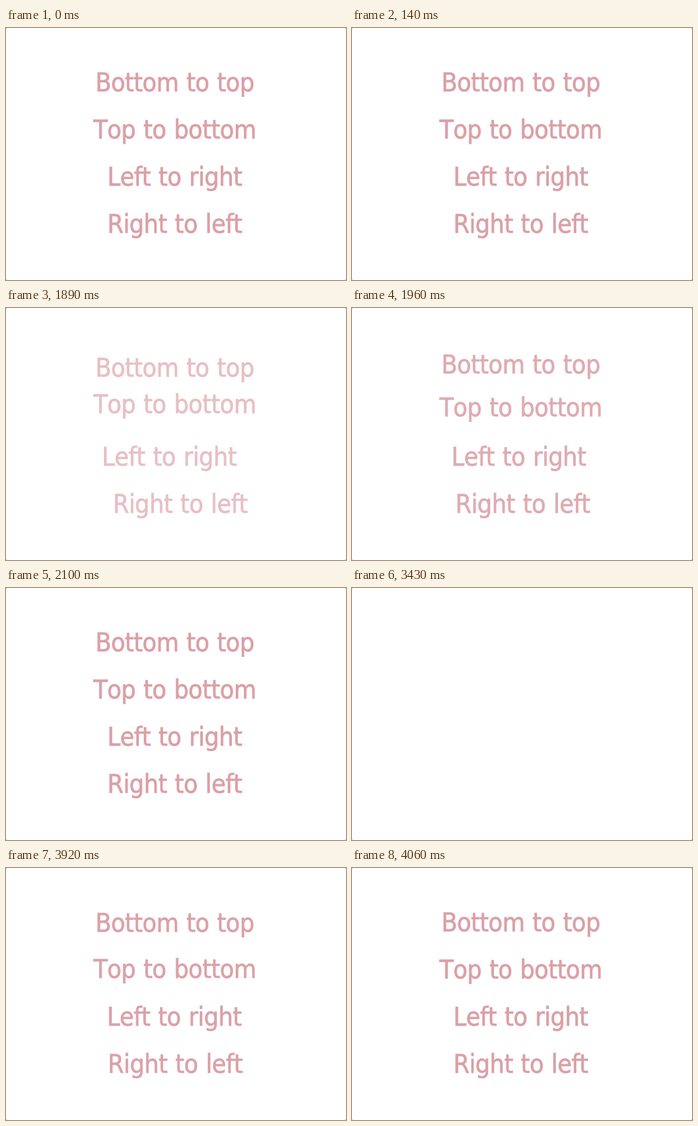
Write an HTML page that moves like this. It is 632 px wide and 470 px high and loops after 4970 ms.

```html
<!DOCTYPE html>
<html lang="en">
<head>
<meta charset="utf-8">
<title>Directional fade-in</title>
<style>
html, body { margin: 0; width: 100%; height: 100%; overflow: hidden; background: #666; }
svg { display: block; width: 632px; height: 470px; background: #fff; border-radius: 2px; }
text {
  font: condensed 48px "DejaVu Sans Condensed", "DejaVu Sans", sans-serif;
  font-kerning: none;
  letter-spacing: -0.6px;
  word-spacing: 1.5px;
  fill: #dba0a7;
  stroke: #dba0a7;
  stroke-width: 0.9px;
  text-anchor: middle;
}
</style>
</head>
<body>
<svg id="stage" viewBox="0 0 632 470"></svg>
<script>
const LOOP = 4970;
const TICK = 70;      // the picture refreshes in ticks
const REPLAY = 1540;  // first replay
const PERIOD = 1890;  // time between replays
const DELAY = 216;    // blank pause before each fade
const FADE = 350;
const SHIFT = 30;

const stage = document.getElementById("stage");

const lines = [
  ["Bottom to top", 0, 1],
  ["Top to bottom", 0, -1],
  ["Left to right", -1, 0],
  ["Right to left", 1, 0],
].map(([label, dx, dy], i) => {
  const el = document.createElementNS(stage.namespaceURI, "text");
  el.setAttribute("x", 313.7);
  el.setAttribute("y", 118 + 88 * i);
  el.textContent = label;
  stage.append(el);
  return { el, dx, dy };
});

const bezier = (a, b, u) => 3 * a * u * (1 - u) ** 2 + 3 * b * u * u * (1 - u) + u ** 3;

// CSS "ease": cubic-bezier(.25, .1, .25, 1), solved by bisection
function ease(x) {
  if (x <= 0) return 0;
  if (x >= 1) return 1;
  let lo = 0, hi = 1;
  for (let i = 0; i < 20; i++) {
    const mid = (lo + hi) / 2;
    if (bezier(0.25, 0.25, mid) < x) lo = mid; else hi = mid;
  }
  return bezier(0.1, 1, lo);
}

function progress(time) {
  const t = Math.floor(time / TICK) * TICK - REPLAY;
  return t < 0 ? 1 : ease((t % PERIOD - DELAY) / FADE);
}

function draw(time) {
  const p = progress(time % LOOP);
  const d = SHIFT * (1 - p);
  for (const { el, dx, dy } of lines) {
    el.setAttribute("opacity", p);
    el.setAttribute("transform", `translate(${dx * d} ${dy * d})`);
  }
}

let start;
function loop(now) {
  start ??= now;
  draw(now - start);
  requestAnimationFrame(loop);
}
draw(0);
requestAnimationFrame(loop);
</script>
</body>
</html>
```
